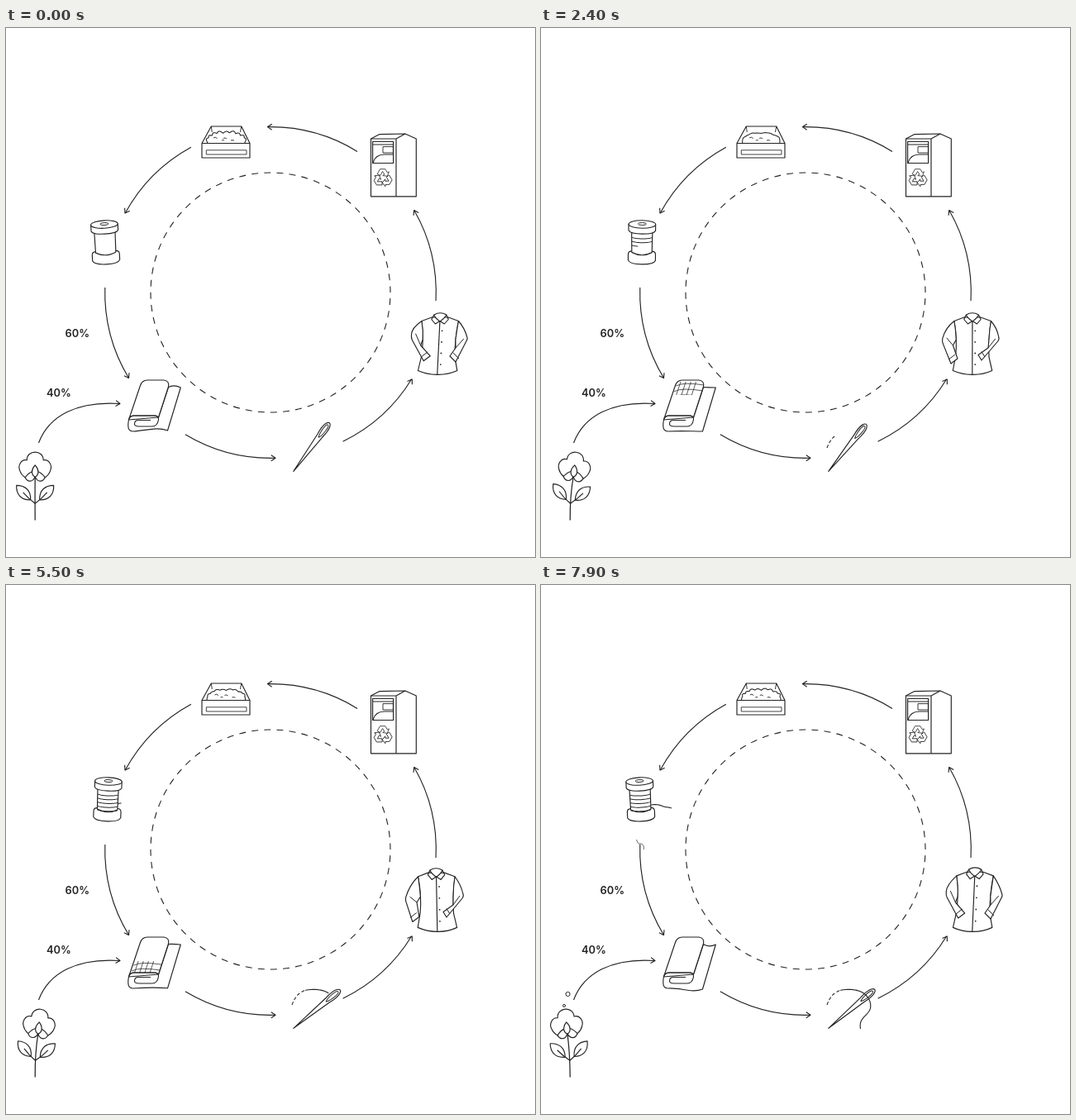
Animation of 640 by 640 pixels, one loop 8 s. Source, as an HTML page with a canvas:

```html
<!DOCTYPE html>
<html lang="en">
<head>
<meta charset="utf-8">
<title>Textile cycle</title>
<style>
html, body { margin: 0; width: 100%; height: 100%; overflow: hidden; background: #fff; }
canvas { display: block; width: 640px; height: 640px; }
</style>
</head>
<body>
<canvas id="stage"></canvas>
<script>
const LOOP = 8000, STEP = 100, SIZE = 640, INK = '#232323';
const canvas = document.getElementById('stage');
const ctx = canvas.getContext('2d');
const dpr = window.devicePixelRatio || 1;
canvas.width = canvas.height = SIZE * dpr;

// Smooth monotone curve through [time, value] keys.
function track(t, keys) {
  const last = keys.length - 1;
  if (t <= keys[0][0]) return keys[0][1];
  if (t >= keys[last][0]) return keys[last][1];
  const rise = i => i < 0 || i >= last ? 0
    : (keys[i + 1][1] - keys[i][1]) / (keys[i + 1][0] - keys[i][0]);
  const slope = i => {
    const a = rise(i - 1), b = rise(i);
    return a * b <= 0 ? 0 : 2 * a * b / (a + b);
  };
  let i = 0;
  while (t > keys[i + 1][0]) i++;
  const span = keys[i + 1][0] - keys[i][0], u = (t - keys[i][0]) / span;
  const h = u * u * (3 - 2 * u);
  return keys[i][1] * (1 - h) + keys[i + 1][1] * h
    + span * u * (1 - u) * ((1 - u) * slope(i) - u * slope(i + 1));
}

const mix = (a, b, k) => a + (b - a) * k;

function draw(d, fill = true, width = 1.15) {
  const path = new Path2D(d);
  ctx.lineWidth = width;
  if (fill) ctx.fill(path);
  ctx.stroke(path);
}

function ellipse(x, y, rx, ry, width = 1.1) {
  ctx.beginPath();
  ctx.ellipse(x, y, rx, ry, 0, 0, Math.PI * 2);
  ctx.lineWidth = width;
  ctx.fill();
  ctx.stroke();
}

function group(x, y, angle, body) {
  ctx.save();
  ctx.translate(x, y);
  ctx.rotate(angle);
  body();
  ctx.restore();
}

// Points along chained cubics: x, y, then six numbers per piece.
function points(c) {
  const out = [[c[0], c[1]]];
  for (let i = 0; i + 7 < c.length; i += 6) {
    for (let n = 1; n <= 24; n++) {
      const u = n / 24, v = 1 - u;
      out.push([0, 1].map(k => v * v * v * c[i + k] + 3 * v * v * u * c[i + 2 + k]
        + 3 * v * u * u * c[i + 4 + k] + u * u * u * c[i + 6 + k]));
    }
  }
  return out;
}

// Strokes the part of a curve between two lengths.
function trail(curve, from, to, width) {
  if (to <= from) return;
  const p = points(curve);
  let run = 0;
  ctx.beginPath();
  for (let i = 1; i < p.length; i++) {
    const [x0, y0] = p[i - 1], [x1, y1] = p[i];
    const len = Math.hypot(x1 - x0, y1 - y0);
    const a = Math.max(0, (from - run) / len), b = Math.min(1, (to - run) / len);
    if (a < b) {
      if (a > 0 || run <= from) ctx.moveTo(mix(x0, x1, a), mix(y0, y1, a));
      ctx.lineTo(mix(x0, x1, b), mix(y0, y1, b));
    }
    run += len;
  }
  ctx.lineWidth = width;
  ctx.stroke();
}

function head(x, y, angle) {
  group(x, y, angle, () => draw('M-5.2-3.5L0 0L-5.2 3.5', false));
}

function ringArrow(x0, y0, x1, y1) {
  const a = Math.atan2(y0 - 320, x0 - 320), b = Math.atan2(y1 - 320, x1 - 320);
  ctx.beginPath();
  ctx.arc(320, 320, 200.3, a, b, true);
  ctx.lineWidth = 1.15;
  ctx.stroke();
  head(x1, y1, b - Math.PI / 2 + 0.03);
}

function ring() {
  const unit = Math.PI * 2 * 145 / 60;
  ctx.beginPath();
  ctx.arc(320, 320, 145, 0, Math.PI * 2);
  ctx.setLineDash([8, unit - 8]);
  ctx.lineDashOffset = 8;
  ctx.lineWidth = 1.1;
  ctx.stroke();
  ctx.setLineDash([]);
  ctx.lineDashOffset = 0;
  ringArrow(425, 149.5, 316.5, 119.6);
  ringArrow(224, 144.5, 144, 224);
  ringArrow(119.8, 314, 148.5, 423.5);
  ringArrow(217, 491.5, 326, 520.2);
  ringArrow(407.5, 500, 491.3, 425);
  ringArrow(520, 330, 493.7, 220.5);
  draw('M39.5 502C52 469 86 451 138 454.5', false);
  head(138, 454.5, 0.08);
}

function labels() {
  ctx.fillStyle = INK;
  ctx.font = '600 12.8px Inter, "Open Sans", sans-serif';
  ctx.textAlign = 'center';
  ctx.fillText('60%', 86.3, 374.2);
  ctx.fillText('40%', 64, 446.3);
  ctx.fillStyle = '#fff';
}

function bin() {
  draw('M441.5 134L452 128.6L483 128L496.3 134V203.8H441.5Z');
  draw('M441.5 134H472V203.8M472 134L483 128', false);
  draw('M443.6 137.5H468.6V163.5H443.6ZM443.6 141H468.6', false);
  draw('M456 143.6H468.4V151H456Z', false, 0.9);
  draw('M444 163C446 156 452 153 458 153H468.4', false);
  for (let i = 0; i < 3; i++) {
    group(456, 181.5, i * Math.PI * 2 / 3, () =>
      draw('M-6.8-5L-3.5-10.8H2.8L5.4-6.6L7.4-7.6L5.3-2.2L-.2-3L1.8-4.4L-.4-8L-3.2-3Z', false, 0.8));
  }
}

function crate(t) {
  draw('M237 139.5L248.3 119H284.8L295 139.5');
  draw('M248.3 119L249.3 126M284.8 119L283.4 126', false, 0.9);
  const puff = Math.cos(t / 3300 * Math.PI * 2);
  ctx.beginPath();
  for (let i = 0; i <= 120; i++) {
    const u = i / 120, a = Math.PI * u;
    const wave = puff > 0 ? Math.abs(Math.sin(9 * a)) : Math.abs(Math.cos(9 * a));
    const bump = 2.4 * Math.abs(puff) * wave + 0.5 * Math.sin(23 * u);
    const x = 266.5 - (22.5 + bump * 0.7) * Math.cos(a);
    const y = 139.5 - 12.5 * Math.pow(Math.sin(a), 0.6) - bump * Math.sin(a);
    ctx.lineTo(x, Math.min(y, 139.5));
  }
  ctx.lineWidth = 1.05;
  ctx.fill();
  ctx.stroke();
  const d = -puff;
  draw(`M${252 + d} 133q2-2 4.500 .5M${264 + d} 133.500q2-1.500 4 .5M${273 + d} 136q2-1 4 .3M${260 - d} 136q2-1 3 0`, false, 0.9);
  draw('M237 139.500H295V157H237Z');
  draw('M242.300 147.800H291V153H242.300Z', false, 0.85);
}

const lean = t => 0.2 - 2.9 * Math.cos((t - 200) / 8200 * Math.PI * 2);

function spool(t) {
  const s = lean(t);
  const k = track(t, [[6500, 0], [7900, 1]]);
  const tail = [133.5, 266, mix(138, 140, k), mix(263, 265, k), mix(142, 143, k), mix(263, 266, k),
    mix(146, 147, k), mix(268, 267.5, k), mix(149, 150, k), mix(274, 269, k), mix(152, 154, k),
    mix(276, 268.5, k), mix(157.5, 158, k), mix(275, 270, k)];
  trail(tail, 0, track(t, [[5100, 0], [5500, 6.5], [6500, 28], [7900, 28]]), 1.1);
  group(121.8 + s * 0.18, 284, s / 52, () => {
    draw('M-16.500-10Q-16.500-14-12-14H12Q16.500-14 16.500-10V-3C14 3.500-14 3.500-16.500-3Z');
    draw('M-12.600-37L-12.200-12.500Q0-6 12.200-12.500L12.600-37Z');
    const turns = track(t, [[900, 0], [1600, 1], [2400, 2.3], [3700, 4], [5500, 5], [8000, 5]]);
    for (let i = 0; i < 5; i++) {
      const y = -30.5 + i * 4.7, part = Math.min(1, turns - i);
      if (part > 0) trail([-12.3, y, -6, y + 2, 6, y + 2, 12.3, y], 0, 25 * part, 1);
    }
    draw('M-16.300-46.500V-39C-14-33.500 14-33.500 16.300-39V-46.500Z');
    ellipse(0, -46.5, 16.3, 4.7);
    ellipse(0, -47, 5, 1.5, 0.95);
  });
  const curl = [115.6, 308, 117, 313, 118, 313, 120, 313, 123, 313, 125.5, 316, 124, 320.5];
  trail(curl, 0, track(t, [[6400, 0], [6500, 1.2], [7900, 17]]), 0.8);
}

function fabric(t) {
  const w = track(t, [[0, -1], [1600, 1], [2400, 0], [3700, 0], [5500, -0.2], [6500, -0.6], [7900, 1]]);
  draw(`M148.500 474Q147 481 148.500 485Q150 488 154 488C170 487 182 ${488 + 6 * w} 195.500 ${488 + w}
    L211.300 435Q203 ${435 + 4 * w} 196.500 434.500L184.500 471Z`);
  const face = 'M148.500 474L162.300 433Q164.500 426 171 426H191Q198 427 196.500 434L184.500 471L181 469H154Q149.500 470 148.500 474Z';
  draw(face);

  const lo = track(t, [[2300, 427], [3700, 429], [5500, 455], [6300, 470]]);
  const hi = track(t, [[1200, 427], [1600, 433], [2400, 444], [3700, 463], [5500, 469.500]]);
  if (hi > lo) {
    ctx.save();
    ctx.clip(new Path2D(face));
    ctx.beginPath();
    ctx.rect(145, lo, 60, hi - lo);
    ctx.clip();
    for (let i = 0; i < 4; i++) {
      const x = 169 + i * 6.2;
      draw(`M${x} 428L${x - 13.5} 469`, false, 0.75);
    }
    for (let i = 0; i < 6; i++) {
      const y = 431 + i * 6.8, shift = (y - 432) * 0.33;
      draw(`M${163 - shift} ${y + 2}Q${172 - shift} ${y - 3} ${197 - shift} ${y + 1}`, false, 0.75);
    }
    ctx.restore();
  }
  draw('M148.500 474Q149.500 469 155 469H179Q185 469 184.500 474Q183 482 177 482H161Q155 482 155.500 478.500Q156 474.500 160 474.500H175', false);
}

function needle(t) {
  const angle = track(t, [[0, 53.4], [1600, 52.8], [2400, 51.2], [3700, 46.1], [5500, 39.4], [6500, 39], [7900, 40]]);
  group(347.8, 536.3, -angle * Math.PI / 180, () => {
    draw('M0 0L53-3.400C60-4.400 67-4.300 70-3C74-1.200 74 1.200 70 3C67 4.300 60 4.400 53 3.400Z');
    draw('M51 0C54-2 64-2.600 68-1.700C70.500-1 70.500 1 68 1.700C64 2.600 54 2 51 0Z', true, 0.95);
  });
  const thread = [346, 508, 350, 497, 356, 491.5, 364, 490, 374, 488.5, 384, 489.5, 390.5, 494,
    398, 499.5, 401, 509, 397, 515.5, 392, 523, 384.5, 525, 386.5, 537];
  const len = track(t, [[900, 0], [1600, 11], [2400, 17], [3700, 25], [5500, 54], [6500, 69], [7900, 104]]);
  ctx.setLineDash([4, 2.6]);
  trail(thread, 0, Math.min(len, 25), 1.1);
  ctx.setLineDash([]);
  trail(thread, 25, len, 1.1);
}

function shirt(t) {
  const s = lean(t);
  const r = track(t, [[0, 1], [1600, 0], [2400, 0], [3700, 1], [5500, 0], [6500, 0], [7900, 1]]);
  const rise = track(t, [[3700, 0], [5500, -2], [6500, -3], [7900, -3]]);
  const sway = 0.5 - 1.1 * s;
  ctx.save();
  // Lean the torso over a fixed hem.
  ctx.transform(1, 0, -sway / 74, 1 - rise / 74, 418 * sway / 74, 418 * rise / 74);
  draw('M512 350L500 354.500Q504 378 501.500 398L498.300 414.500Q510 419.500 522 419.300Q535 419.500 545.700 414.500L542 398Q541 376 544.500 354.500L532 350Z');
  draw('M522 354L521.800 419', false);
  draw('M514.500 347Q522 342.500 529.500 347Q528 351 522 355Q516 351 514.500 347Z');
  draw('M514.500 347L511.800 352.500L516.500 358L522 354.500M529.500 347L532.200 352.500L527.500 358L522 354.500', false);
  ctx.fillStyle = INK;
  for (let i = 0; i < 4; i++) {
    ctx.beginPath();
    ctx.arc(525.2, 366.3 + i * 13.6, 0.9, 0, 7);
    ctx.fill();
  }
  ctx.fillStyle = '#fff';
  ctx.restore();

  const top = sway * 0.86, mid = sway * 0.55, y = 354.5 + rise * 0.86;
  const ex = 486.5 - 1.5 * s, ey = 379 + 1.6 * s, cx = 497.5 - 2.9 * s, cy = 405.5 + s;
  draw(`M${500 + top} ${y}Q${489 + top * 0.6} 363 ${ex} ${ey - 4}Q${ex - 0.5} ${ey} ${ex + 1} ${ey + 3}
    L${cx} ${cy}L${cx + 8} ${cy - 6}L${499 - s} 384L${502.3 + mid} 377Q${502 + top} 366 ${500 + top} ${y}Z`);
  draw(`M${cx - 2.7} ${cy - 5}L${cx + 5} ${cy - 11}M${ex + 5} ${ey - 5}L${499 - s} 384`, false, 1);

  const fx = 554 + 2.5 * r - 0.5 * s, ox = 533 + 11 * r, oy = 402 + 2 * r;
  const ix = 529 + 8 * r, iy = 395.5 + 1.5 * r;
  draw(`M${544.5 + top} ${y}Q${552 + top} 363 ${fx} 374Q${fx + 1} 376 ${fx - 1} 379L${ox} ${oy}
    L${ix} ${iy}L${541 + 3 * r} 387L${542 + mid} 377Q${542.5 + top} 365 ${544.5 + top} ${y}Z`);
  draw(`M${ox + 4} ${oy - 4}L${ix + 4} ${iy - 4}M${541 + 3 * r} 387L${fx - 4} 376`, false, 1);
}

function leaf() {
  draw('M-22.500-22C-12-22-5-16-5.500-4.500C-16-4-23-10-22.500-22Z');
  draw('M-14.500-13.500Q-8-6 0 0', false);
}

function plant(t) {
  const sway = track(t, [[0, 0], [800, 0.4], [1600, 2.5], [2400, 5.5], [3700, 9.5], [5500, 5], [6500, -2], [7250, -5], [7900, -4.5]]);
  const x = 35.2 + sway * 0.72;
  // Fluff drifting up from behind the flower.
  for (const [start, speed] of [[7150, 0.031], [7600, 0.031]]) {
    const age = t - start;
    if (age > 0) ellipse(27.5 + Math.max(0, age - 250) * 0.01, 518.2 - age * speed, Math.min(2.6, 0.5 + age / 300), Math.min(2.6, 0.5 + age / 300), 1);
  }
  draw(`M35.200 595.500Q35 566 ${x} 543`, false, 1.25);
  group(35.2 + sway * 0.05, 575.3, sway * 0.014, () => {
    leaf();
    ctx.scale(-1, 1);
    leaf();
  });
  group(x, 543.3, sway * 0.02, () => {
    draw('M-10-20.500C-10-33.500 10-33.500 10-20.500C17-22 21-14 18.500-8C17-3 14-1 12 .5H-12C-14-1-17-3-18.500-8C-21-14-17-22-10-20.500Z');
    for (const side of [-1, 1]) {
      ctx.save();
      ctx.scale(side, 1);
      draw('M0-1C2 6 9 7 12 .5Q8-5 3.500-6.500Z');
      ctx.restore();
    }
    draw('M0-14.500C-5-9-5-3 0 0C5-3 5-9 0-14.500Z');
  });
}

function frame(now) {
  const t = Math.floor((now % LOOP) / STEP) * STEP;
  ctx.setTransform(dpr, 0, 0, dpr, 0, 0);
  ctx.fillStyle = '#fff';
  ctx.fillRect(0, 0, SIZE, SIZE);
  ctx.strokeStyle = INK;
  ctx.lineJoin = 'round';
  ring();
  labels();
  bin();
  for (const part of [crate, spool, fabric, needle, shirt, plant]) part(t);
  requestAnimationFrame(frame);
}
requestAnimationFrame(frame);
</script>
</body>
</html>
```
